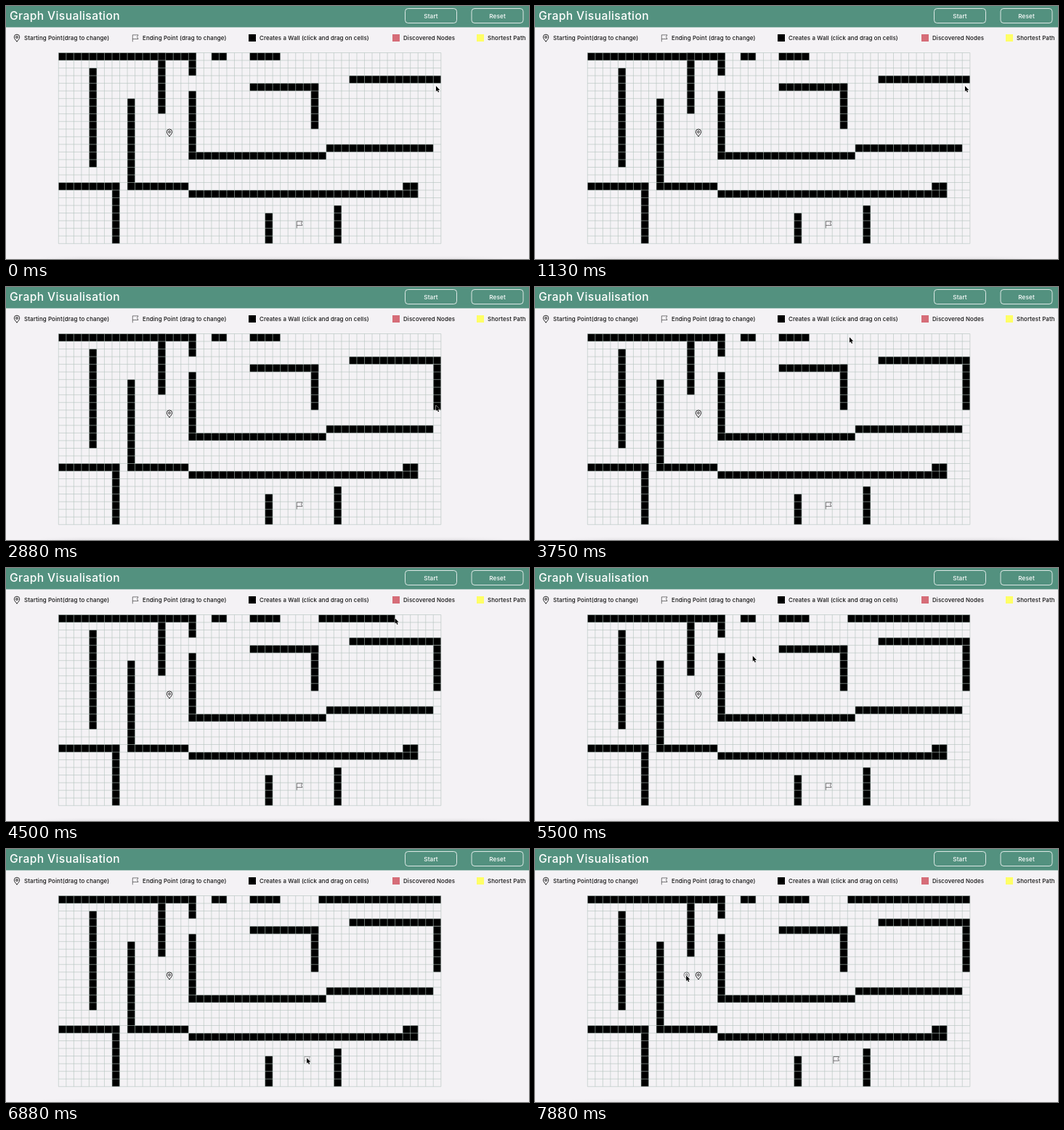
These frames come from a looping animation (720x349 px, 8000 ms). An HTML page with a canvas:

```html
<!DOCTYPE html>
<html lang="en">
<head>
<meta charset="utf-8">
<title>Graph Visualisation</title>
<style>
  html, body { margin: 0; width: 100%; height: 100%; overflow: hidden; background: #f4f2f5; }
  canvas, svg { position: absolute; left: 0; top: 0; width: 720px; height: 349px; }
  text { font: 500 7.9px Inter, "Open Sans", sans-serif; letter-spacing: .12px; fill: #111; }
  .light { fill: #fff; }
  .title { font-size: 15.6px; letter-spacing: .4px; }
  .button { font-size: 8.2px; text-anchor: middle; }
</style>
</head>
<body>
<canvas id="stage"></canvas>
<svg viewBox="0 0 720 349">
  <text class="light title" x="5" y="19">Graph Visualisation</text>
  <text class="light button" x="585" y="17">Start</text>
  <text class="light button" x="676.5" y="17">Reset</text>
  <text x="25" y="47">Starting Point(drag to change)</text>
  <text x="188" y="47">Ending Point (drag to change)</text>
  <text x="349" y="47">Creates a Wall (click and drag on cells)</text>
  <text x="547" y="47">Discovered Nodes</text>
  <text x="663" y="47">Shortest Path</text>
</svg>
<script>
const W = 720, H = 349, LOOP = 8000, STEP = 125;
const X0 = 72.3, Y0 = 64.5, CELL = 10.53, COLS = 50, ROWS = 25;

const canvas = document.getElementById('stage');
const ctx = canvas.getContext('2d');
const dpr = window.devicePixelRatio || 1;
canvas.width = W * dpr;
canvas.height = H * dpr;

const pinShape = new Path2D('M0 5C-1.2 3-3.7 1-3.7-1.4A3.7 3.7 0 0 1 3.7-1.4C3.7 1 1.2 3 0 5Z');
const flagShape = new Path2D('M-3.7 5V-4.4H4L2.5-1.6L4 1.2H-3.7');
const arrowShape = new Path2D('M0 0V7.6L1.7 6L2.9 8.8L4.2 8.3L3 5.6H5.3Z');

const toX = col => X0 + col * CELL;
const toY = row => Y0 + row * CELL;

function rect(x, y, w, h, color) {
  ctx.fillStyle = color;
  ctx.fillRect(x, y, w, h);
}

function outline(shape, color, width) {
  ctx.strokeStyle = color;
  ctx.lineWidth = width;
  ctx.stroke(shape);
}

function at(x, y, draw, alpha = 1) {
  ctx.save();
  ctx.translate(x, y);
  ctx.globalAlpha = alpha;
  draw();
  ctx.restore();
}

const inCell = (col, row, draw, alpha) => at(toX(col + 0.5), toY(row + 0.5), draw, alpha);

function pin() {
  outline(pinShape, '#111', 0.9);
  ctx.beginPath();
  ctx.arc(0, -1.3, 1.4, 0, Math.PI * 2);
  ctx.stroke();
}

const flag = () => outline(flagShape, '#222', 0.6);

function arrow() {
  outline(arrowShape, '#fff', 1);
  ctx.fillStyle = '#000';
  ctx.fill(arrowShape);
}

function button(x) {
  const box = new Path2D();
  box.roundRect(x, 3.5, 71, 20, 4);
  outline(box, '#fff', 0.8);
}

function page() {
  rect(0, 0, W, H, '#f4f2f5');
  rect(0, 0, W, 29.4, '#53917f');
  button(549.5);
  button(641);
  at(15, 44.3, pin);
  at(178, 44.3, flag);
  rect(334, 39, 10, 10, '#000');
  rect(532, 39, 10, 10, '#d66d78');
  rect(648, 39, 10, 10, '#ffff66');

  const shade = ctx.createLinearGradient(40, 0, 690, 0);
  for (const k of [0, 0.1, 0.9, 1]) {
    shade.addColorStop(k, `rgba(90,85,95,${k % 1 ? 0.02 : 0})`);
  }
  for (let y = 345; y < H; y++) rect(40, y, 650, H - y, shade);
}

// A wall is a walk over the grid, filling every cell on its way
function wall(col, row) {
  const walk = (dc, dr) => n => {
    const c = col + dc * n, r = row + dr * n;
    rect(toX(Math.min(col, c)), toY(Math.min(row, r)),
      (Math.abs(c - col) + 1) * CELL, (Math.abs(r - row) + 1) * CELL, '#000');
    [col, row] = [c, r];
    return pen;
  };
  const pen = { right: walk(1, 0), left: walk(-1, 0), down: walk(0, 1), up: walk(0, -1) };
  return pen;
}

function maze() {
  wall(0, 0).right(17).down(2);
  wall(20, 0).right(1);
  wall(25, 0).right(3);
  wall(13, 0).down(7);
  wall(4, 2).down(12);
  wall(17, 5).down(8).right(17);
  wall(25, 4).right(8).down(5);
  wall(38, 3).right(11);
  wall(35, 12).right(13);
  wall(9, 6).down(11).right(7);
  wall(0, 17).right(7).down(7);
  wall(17, 18).right(29).up(1).left(1);
  wall(27, 21).down(3);
  wall(36, 20).down(4);
}

function gridLines() {
  const lines = new Path2D();
  for (let c = 0; c <= COLS; c++) {
    lines.moveTo(toX(c), Y0);
    lines.lineTo(toX(c), toY(ROWS));
  }
  for (let r = 0; r <= ROWS; r++) {
    lines.moveTo(X0, toY(r));
    lines.lineTo(toX(COLS), toY(r));
  }
  outline(lines, '#b3c2bd', 0.6);
}

// Pointer position in cells: each glide slows down towards its goal
function pointerAt(t) {
  let col = 49.35, row = 4.35;
  const glide = (start, end, c, r) => {
    const k = Math.min(1, Math.max(0, (t - start) / (end - start)));
    const ease = 1 - (1 - k) ** 2;
    col += (c - col) * ease;
    row += (r - row) * ease;
  };
  glide(1250, 2125, 49.35, 4.75);
  glide(2125, 2875, 49.35, 9.4);
  glide(3000, 3750, 34.25, 0.45);
  glide(4000, 5250, 49.45, 0.45);
  glide(5375, 5500, 21.6, 5.4);
  glide(5500, 6125, 31.5, 22.3);
  glide(6250, 6750, 32.45, 21.25);
  glide(7000, 7500, 14.4, 10.4);
  glide(7625, 7875, 12.9, 10.45);
  return [col, row];
}

function render(time) {
  // The screen refreshes eight times a second, on whole centiseconds
  const t = Math.floor(Math.floor(time / 10) * 10 / STEP) * STEP;
  const [col, row] = pointerAt(t);

  ctx.setTransform(dpr, 0, 0, dpr, 0, 0);
  page();
  maze();
  if (t >= 2000) wall(49, 4).down(t < 3000 ? Math.floor(row) - 4 : 5);
  if (t >= 4000) wall(34, 0).right(t < 5375 ? Math.floor(col) - 34 : 15);
  gridLines();

  inCell(14, 10, pin);
  if (t < 6750) inCell(31, 22, flag);
  else inCell(32, 21, flag, t < 7125 ? 0.6 : 1);
  if (t >= 6500 && t < 6750) at(toX(col), toY(row) + 2.5, flag, 0.5);
  if (t >= 7750) inCell(col - 0.45, 10, pin, 0.6);
  at(toX(col), toY(row), arrow);
}

function tick(now) {
  render(now % LOOP);
  requestAnimationFrame(tick);
}
render(0);
requestAnimationFrame(tick);
</script>
</body>
</html>
```
